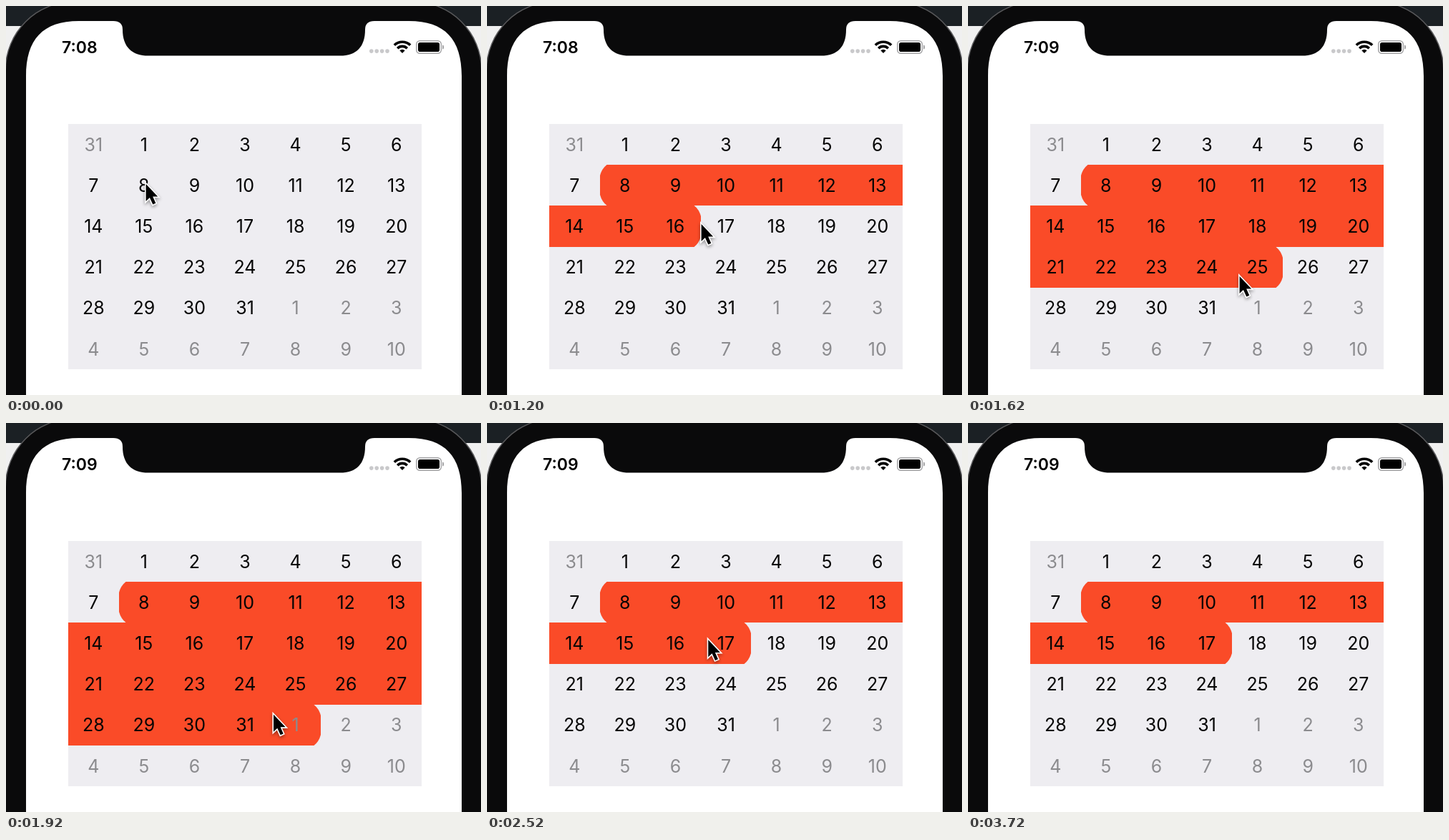
Animation of 664 by 544 pixels, one loop 3780 ms. Source, as an HTML page with a canvas:

```html
<!DOCTYPE html>
<html lang="en">
<head>
<meta charset="utf-8">
<title>Date range selection</title>
<style>
  html, body { margin: 0; width: 100%; height: 100%; overflow: hidden; background: #f0f0f0; }
  canvas { display: block; }
</style>
</head>
<body>
<canvas width="664" height="544"></canvas>
<script>
const ctx = document.querySelector('canvas').getContext('2d');
const LOOP = 3780, STEP = 60;
const PRESS = 360, RELEASE = 3000, MINUTE = 1380;
const GRID = { x: 87, y: 165, w: 494 / 7, h: 343 / 6 };
const START = 8;

// Pointer path: time, x, y
const PATH = [
  [0, 194, 246], [600, 196, 248], [900, 223, 271], [1200, 298, 302],
  [1620, 378, 375], [1800, 396, 420], [2220, 277, 328],
  [2880, 348, 289], [3000, 348, 289], [3300, 354, 560]
];

// Slope at b; flat where the direction turns
function slope(a, b, c, k) {
  return (b[k] - a[k]) * (c[k] - b[k]) > 0 ? (c[k] - a[k]) / (c[0] - a[0]) : 0;
}

function pointer(t) {
  let i = 0;
  while (i < PATH.length - 2 && t >= PATH[i + 1][0]) i++;
  const a = PATH[i], b = PATH[i + 1];
  const before = PATH[i - 1] || a, after = PATH[i + 2] || b;
  const span = b[0] - a[0], u = Math.min(1, (t - a[0]) / span);
  return [1, 2].map(k => {
    const va = slope(before, a, b, k) * span;
    const vb = slope(a, b, after, k) * span;
    const d = b[k] - a[k];
    return a[k] + u * (va + u * (3 * d - 2 * va - vb + u * (va + vb - 2 * d)));
  });
}

function fill(color, path) {
  ctx.fillStyle = color;
  ctx.fill(new Path2D(path));
}

function roundRect(color, x, y, w, h, r) {
  ctx.beginPath();
  ctx.roundRect(x, y, w, h, r);
  ctx.fillStyle = color;
  ctx.fill();
}

function drawPhone() {
  ctx.fillStyle = '#f0f0f0';
  ctx.fillRect(0, 0, 664, 544);
  ctx.fillStyle = '#1b2024';
  ctx.fillRect(0, 0, 664, 28);
  roundRect('#59595b', -1.5, -7, 667, 700, 97);
  roundRect('#0a0a0b', 0, -5.5, 664, 700, 95.5);
  fill('#fff', `M28 544V98C28 47 51 21 102 21H150Q163 21 163 33
    C163 57 176 69.6 199 69.6H467C490 69.6 502 57 502 33Q502 21 515 21
    H563C614 21 637 47 637 98V544Z`);
}

function drawStatus(t) {
  ctx.fillStyle = '#000';
  ctx.font = '600 23px Inter, sans-serif';
  ctx.textAlign = 'left';
  ctx.fillText(t < MINUTE ? '7:08' : '7:09', 78, 66);

  for (let i = 0; i < 4; i++) roundRect('#c9c9cb', 508 + i * 7.4, 60.3, 5.6, 5.6, 2.8);

  ctx.fillStyle = '#000';
  for (const [inner, outer] of [[14, 17.6], [7.8, 11.4], [0, 5.2]]) {
    ctx.beginPath();
    ctx.arc(554, 66, outer, -Math.PI * 0.75, -Math.PI / 4);
    ctx.arc(554, 66, inner, -Math.PI / 4, -Math.PI * 0.75, true);
    ctx.fill();
  }

  roundRect('#a2a2a4', 573, 48, 36, 19, 5.5);
  roundRect('#fff', 574.5, 49.5, 33, 16, 4);
  roundRect('#000', 576, 51, 30, 13, 2.8);
  roundRect('#a2a2a4', 610, 54.5, 2, 6, [0, 2, 2, 0]);
}

function drawRange(from, to) {
  const { x, y, w, h } = GRID;
  const cutX = 9.5, cutY = 15;
  for (let i = from; i <= to; i++) {
    const col = i % 7, row = Math.floor(i / 7);
    const left = Math.round(x + col * w), right = Math.round(x + (col + 1) * w);
    const top = Math.round(y + row * h), bottom = Math.round(y + (row + 1) * h);
    const l = i === from ? 1 : 0, r = i === to ? 1 : 0;
    ctx.beginPath();
    ctx.moveTo(left + l * cutX, top);
    ctx.lineTo(right - r * cutX, top);
    ctx.quadraticCurveTo(right - r * 2.5, top + r * 5.5, right, top + r * cutY);
    ctx.lineTo(right, bottom - r * cutY);
    ctx.quadraticCurveTo(right - r * 2.5, bottom - r * 5.5, right - r * cutX, bottom);
    ctx.lineTo(left + l * cutX, bottom);
    ctx.quadraticCurveTo(left + l * 2.5, bottom - l * 5.5, left, bottom - l * cutY);
    ctx.lineTo(left, top + l * cutY);
    ctx.quadraticCurveTo(left + l * 2.5, top + l * 5.5, left + l * cutX, top);
    ctx.fillStyle = '#fa4b28';
    ctx.fill();
  }
}

function drawCalendar(t) {
  const { x, y, w, h } = GRID;
  ctx.fillStyle = '#eeedf1';
  ctx.fillRect(x, y, 7 * w, 6 * h);
  if (t >= PRESS) {
    const [px, py] = pointer(Math.min(t, RELEASE));
    drawRange(START, Math.floor((py - y) / h) * 7 + Math.floor((px - x) / w));
  }
  ctx.font = '25px Inter, sans-serif';
  ctx.textAlign = 'center';
  for (let i = 0; i < 42; i++) {
    ctx.fillStyle = i > 0 && i < 32 ? '#050505' : '#8b8b8e';
    ctx.fillText((i + 30) % 31 + 1, x + (i % 7 + 0.5) * w, y + Math.floor(i / 7) * h + 37.7);
  }
}

function drawPointer(t) {
  const [x, y] = pointer(t);
  const arrow = new Path2D('M0 0V24L5.3 19L9.7 28.6L13.7 26.8L9.6 17.6H16.6Z');
  ctx.save();
  ctx.translate(x + 1.6, y + 3);
  ctx.lineWidth = 3.2;
  ctx.strokeStyle = '#fff';
  ctx.shadowColor = 'rgba(0,0,0,.4)';
  ctx.shadowBlur = 4;
  ctx.shadowOffsetY = 2;
  ctx.stroke(arrow);
  ctx.shadowColor = 'transparent';
  ctx.fillStyle = '#000';
  ctx.fill(arrow);
  ctx.restore();
}

function frame() {
  const t = Math.floor(performance.now() % LOOP / STEP) * STEP;
  drawPhone();
  drawStatus(t);
  drawCalendar(t);
  drawPointer(t);
  requestAnimationFrame(frame);
}
frame();
</script>
</body>
</html>
```
